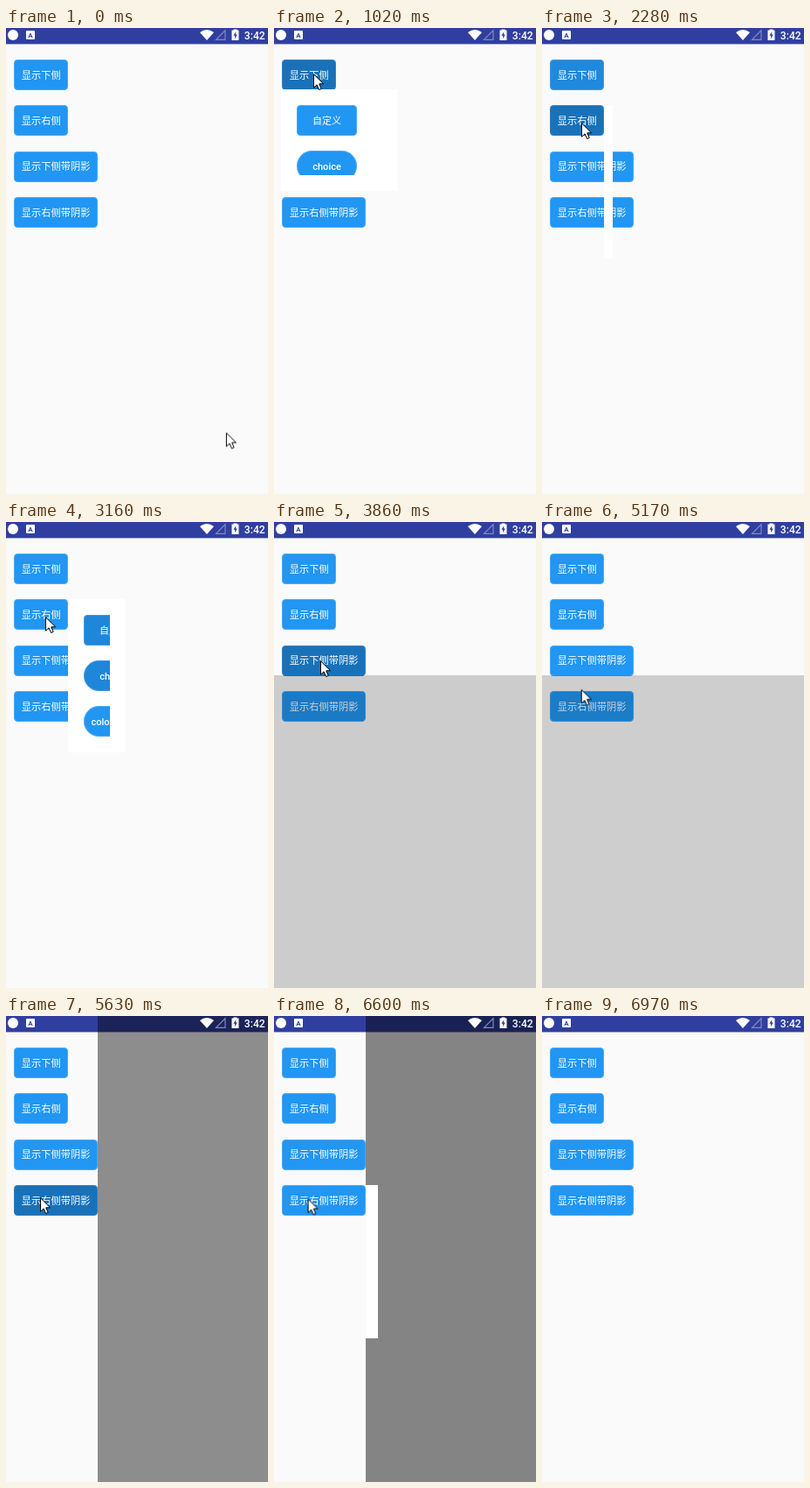
An HTML page that plays this animation: 300 by 532 pixels, repeating every 7440 ms.

```html
<!DOCTYPE html>
<html lang="zh-CN">
<head>
<meta charset="utf-8">
<title>弹出菜单</title>
<style>
  html, body { margin: 0; width: 100%; height: 100%; overflow: hidden; background: #fafafa; }
  body { position: relative; font: 11.25px/1 Roboto, "Noto Sans CJK SC", "Noto Sans CJK", sans-serif; color: #fff; }
  .bar, .dim, .popup, .clip, .button, .shade, .spot, svg { position: absolute; }
  .bar { left: 0; top: 0; width: 100%; height: 18px; background: #303f9f; border-bottom: 1px solid #a9afd6; }
  .button {
    box-sizing: border-box; height: 34.9px; min-width: 62.6px; padding: 0 8.7px;
    display: flex; align-items: center; justify-content: center;
    white-space: nowrap; overflow: hidden; background: #2196f3; border-radius: 4.4px;
    box-shadow: inset 0 0 0 1px rgba(250, 250, 250, .2);
  }
  .popup .button { left: 0; min-width: 69.8px; font-size: 11.05px; font-weight: 500; }
  .popup .pill { border-radius: 17.5px; }
  .shade { inset: 0; background: #000; opacity: 0; }
  .spot { width: 60px; height: 60px; border-radius: 50%; background: #000; opacity: 0; }
  .dim { right: 0; bottom: 0; background: #000; opacity: 0; }
  .popup { overflow: hidden; background: #fff; }
  .clip { inset: 17.5px; overflow: hidden; }
  .label { position: relative; left: .2px; top: .8px; }
  svg { left: 0; top: 0; overflow: visible; }
</style>
</head>
<body>
<div class="bar"></div>
<script>
const LOOP = 7440;
const EASE = 'cubic-bezier(.37,0,.63,1)';
const PITCH = 52.35;
const POPUP = { width: 133, height: 174.7 };
const DIM = 0.476;
const animations = [];

function add(parent, className, style = {}) {
  const el = document.createElement('div');
  el.className = className;
  Object.assign(el.style, style);
  parent.append(el);
  return el;
}

// rows: [ms, value]; values are held before the first and after the last row
function play(el, prop, rows, easing = EASE) {
  const all = [[0, rows[0][1]], ...rows, [LOOP, rows.at(-1)[1]]];
  const frames = all.map(([ms, value]) => ({ offset: ms / LOOP, [prop]: value, easing }));
  animations.push(el.animate(frames, { duration: LOOP, iterations: Infinity }));
}

function addButton(parent, text, style, className = '') {
  const el = add(parent, 'button ' + className, style);
  const shade = add(el, 'shade');
  const spot = add(el, 'spot');
  add(el, 'label').textContent = text;
  return { shade, spot };
}

const mainButtons = [
  { text: '显示下侧', width: 62.6, press: [700, 750, 1040, 1170] },
  { text: '显示右侧', width: 62.6, press: [2150, 2200, 2480, 2680] },
  { text: '显示下侧带阴影', width: 96.3, press: [3420, 3470, 4080, 4440] },
  { text: '显示右侧带阴影', width: 96.3, press: [5300, 5360, 5760, 5980] }
];
mainButtons.forEach(({ text, width, press: [a, b, c, d] }, i) => {
  const { shade } = addButton(document.body, text,
    { left: '8.7px', top: 36 + i * PITCH + 'px', width: width + 'px' });
  const rows = [[a, 0], [b, 0.24], [c, 0.24], [d, 0]];
  if (i === 0) rows.push([1560, 0], [1700, 0.09], [2290, 0.09], [2500, 0]);
  play(shade, 'opacity', rows);
});

function addDim(style, openAt, closeAt) {
  play(add(document.body, 'dim', style), 'opacity',
    [[openAt, 0], [openAt + 300, DIM], [closeAt, DIM], [closeAt + 300, 0]]);
}
addDim({ left: 0, top: '175.3px' }, 3733, 4997);
addDim({ left: '105px', top: 0 }, 5386, 6665);

const items = [['自定义', ''], ['choice', 'pill'], ['colorful - choice', 'pill']];

function addPopup({ x, y, axis, open, tap, close, spotAt }) {
  const el = add(document.body, 'popup', {
    left: x + 'px', top: y + 'px',
    width: POPUP.width + 'px', height: POPUP.height + 'px'
  });
  const size = POPUP[axis] + 'px';
  play(el, axis, [[open, '0px'], [open + 300, size], [close, size], [close + 300, '0px']]);

  const clip = add(el, 'clip');
  items.forEach(([text, className], i) => {
    const { shade, spot } = addButton(clip, text, { top: i * PITCH + 'px' }, className);
    if (i === 2) return;
    play(shade, 'opacity', [[tap, 0], [tap + 90, 0.1], [tap + 320, 0.1], [tap + 420, 0]]);
    if (!spotAt) return;
    spot.style.left = spotAt[0] - 30 + 'px';
    spot.style.top = spotAt[1] - 30 + 'px';
    play(spot, 'opacity', [[tap, 0], [tap + 60, 0.18], [tap + 150, 0.18], [tap + 320, 0]]);
    play(spot, 'transform', [[tap, 'scale(.4)'], [tap + 130, 'scale(1)'], [tap + 320, 'scale(2.4)']], 'linear');
  });
}

addPopup({ x: 8, y: 70.4, axis: 'height', open: 840, tap: 1440, close: 1540, spotAt: [30, -23] });
addPopup({ x: 71, y: 88.3, axis: 'width', open: 2227, tap: 2860, close: 3010 });
addPopup({ x: 8, y: 175.3, axis: 'height', open: 3965, tap: 4600, close: 4697, spotAt: [30, -23] });
addPopup({ x: 105, y: 193, axis: 'width', open: 5690, tap: 6340, close: 6365 });
</script>

<svg width="300" height="18" fill="#fff">
  <circle cx="8" cy="8" r="6"/>
  <rect x="23" y="3" width="10" height="10" rx="1"/>
  <text x="28" y="11" font-size="8" font-weight="700" text-anchor="middle" fill="#303f9f">A</text>
  <path d="M222 5Q230-1 238 5L230 14Z"/>
  <path d="M240.5 13.3H251V2.8Z" fill="none" stroke="#7f88c3" stroke-width="1.2"/>
  <path d="M260.5 2.5V1.5h4v1h2v11.5h-8V2.5Z"/>
  <path d="M263.2 4.2L260.4 8.8H262.1V12.2L264.8 7.5H263.2Z" fill="#303f9f"/>
  <text x="272.8" y="13" font-size="12.1" font-weight="500">3:42</text>
</svg>
<svg id="cursor" width="13" height="20">
  <path d="M.5.8V16.2L4.1 12.8L6.6 18.5L9.2 17.4L6.8 11.8H11.6Z" fill="#fff" stroke="#000"/>
</svg>
<script>
const cursor = document.getElementById('cursor');
const at = (x, y) => `translate(${x}px,${y}px)`;
const stops = [
  [30, 252, 462], [480, 88, 2], [680, 45, 52],
  [1850, 45, 52], [2130, 45, 108],
  [3270, 45, 108], [3430, 53, 158],
  [4590, 53, 158], [4650, 53, 167],
  [5020, 53, 167], [5290, 39, 207],
  [6560, 39, 207], [6880, 27, 240]
];
play(cursor, 'transform', stops.map(([ms, x, y]) => [ms, at(x, y)]));
play(cursor, 'opacity', [[29, 0], [30, 1], [6890, 1], [6891, 0]], 'step-end');

const start = document.timeline.currentTime ?? 0;
animations.forEach(animation => { animation.startTime = start; });
</script>
</body>
</html>
```
